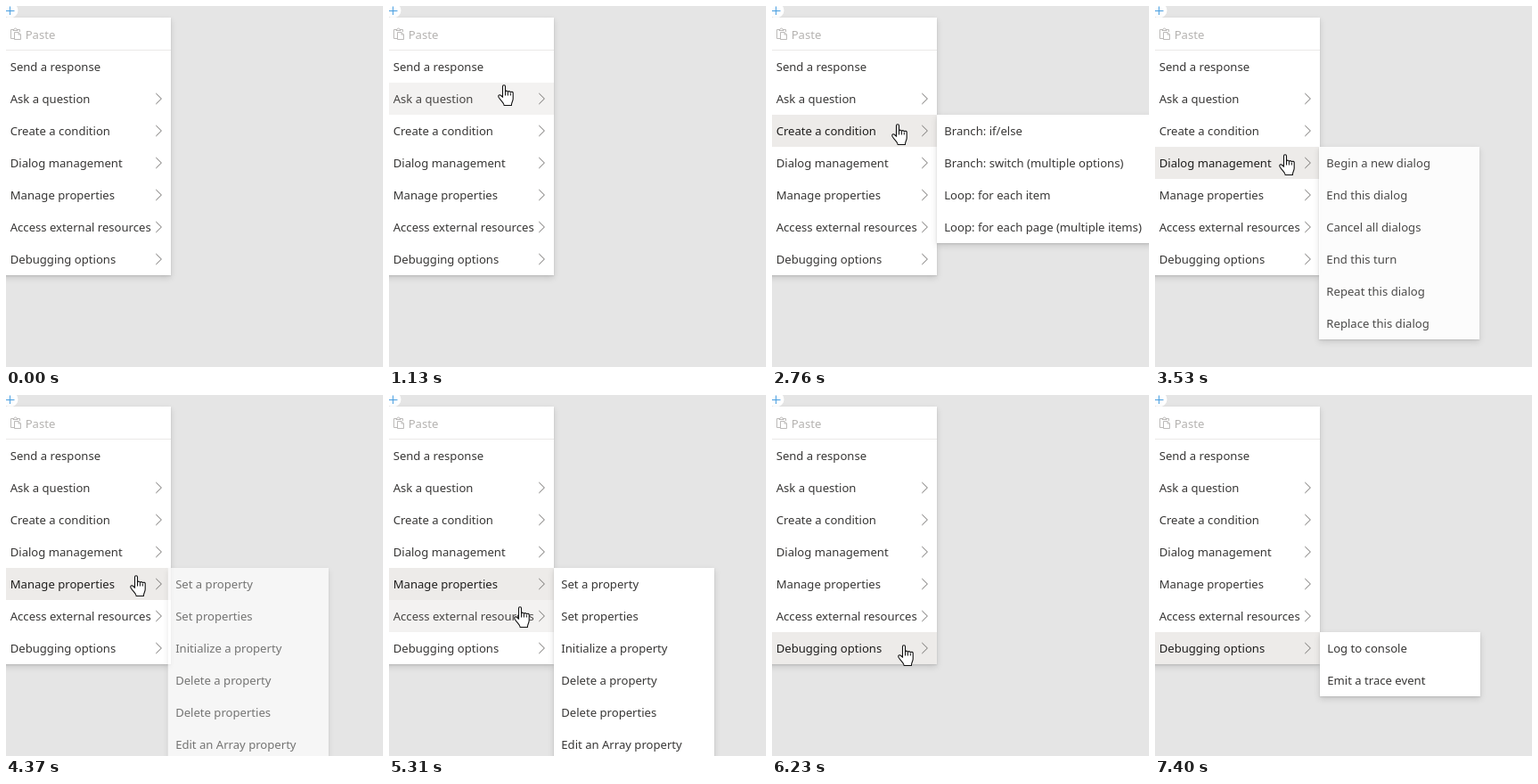
Write an HTML page with a canvas that moves like this. It is 423x405 px and loops after 7930 ms.

```html
<!DOCTYPE html>
<html lang="en">
<head>
<meta charset="utf-8">
<title>Action menu</title>
<style>
html, body { margin: 0; width: 100%; height: 100%; overflow: hidden; background: #e5e5e5; }
canvas { display: block; }
</style>
</head>
<body>
<canvas id="stage" width="423" height="405"></canvas>
<script>
const ctx = document.getElementById('stage').getContext('2d');
const LOOP = 7930, ROW = 36, MENU_RIGHT = 185, MENU_TOP = 50;
const INK = '#383736', INK_HOVER = '#484644', INK_EXPANDED = '#201f1e', INK_DISABLED = '#b5b3b1';
const HOVER = '#f3f2f1', EXPANDED = '#edebe9';

const items = [
  { label: 'Send a response' },
  { label: 'Ask a question', opens: 1330, width: 180, sub: ['Text input', 'Number input', 'Confirmation',
    'Multiple choice', 'File or attachment', 'Date or time', 'OAuth login'] },
  { label: 'Create a condition', opens: 2480, width: 242, sub: ['Branch: if/else',
    'Branch: switch (multiple options)', 'Loop: for each item', 'Loop: for each page (multiple items)'] },
  { label: 'Dialog management', opens: 3400, width: 180, sub: ['Begin a new dialog', 'End this dialog',
    'Cancel all dialogs', 'End this turn', 'Repeat this dialog', 'Replace this dialog'] },
  { label: 'Manage properties', opens: 4320, width: 180, sub: ['Set a property', 'Set properties',
    'Initialize a property', 'Delete a property', 'Delete properties', 'Edit an Array property'] },
  { label: 'Access external resources', opens: 5410, width: 219, sub: ['Connect to a skill',
    'Send an HTTP request', 'Emit a custom event', 'Connect to QnA Knowledgebase'] },
  { label: 'Debugging options', opens: 6230, width: 180, sub: ['Log to console', 'Emit a trace event'] }
];

const bursts = [[70, 510, 7], [660, 660, 1], [830, 830, 1], [1060, 1610, 8], [1760, 1760, 1],
  [1990, 2760, 11], [2990, 3300, 5], [3450, 3680, 4], [3840, 4220, 6], [4370, 4610, 4],
  [4850, 5310, 7], [5460, 5690, 4], [5920, 6550, 9], [6860, 7400, 8]];
const ticks = [0];
for (const [from, to, count] of bursts) {
  for (let i = 0; i < count; i++) {
    const time = from + (count > 1 ? (to - from) * i / (count - 1) : 0);
    ticks.push(Math.floor(time / 10) * 10);
  }
}

// Pointer moves: start, end, x, y of the fingertip.
const moves = [[70, 510, 128, 78], [650, 660, 129, 84], [820, 830, 128, 84], [1000, 1300, 130, 94],
  [1750, 1760, 130, 95], [1910, 2400, 141, 132], [2900, 3300, 146, 166], [3760, 4220, 146, 202],
  [4780, 5310, 147, 237], [5850, 6150, 148, 280], [6790, 7400, 425, 410]];

const clamp = v => Math.min(1, Math.max(0, v));
const smooth = v => v * v * (3 - 2 * v);

function pointerAt(t) {
  let x = 295, y = 297;
  for (const [from, to, nx, ny] of moves) {
    const k = smooth(clamp((t - from) / (to - from)));
    x += (nx - x) * k;
    y += (ny - y) * k;
  }
  return { x, y, visible: t >= 70 && t < 7400 };
}

// cubic-bezier(.1, .9, .2, 1), solved by bisection
function decelerate(x) {
  if (x <= 0) return 0;
  if (x >= 1) return 1;
  const curve = (s, a, b) => 3 * (1 - s) ** 2 * s * a + 3 * (1 - s) * s * s * b + s ** 3;
  let lo = 0, hi = 1;
  for (let i = 0; i < 24; i++) {
    const mid = (lo + hi) / 2;
    if (curve(mid, .1, .2) < x) lo = mid; else hi = mid;
  }
  return curve(lo, .9, 1);
}

function rect(x, y, w, h, color) {
  ctx.fillStyle = color;
  ctx.fillRect(x, y, w, h);
}

function stroke(path, color, width = 1) {
  ctx.strokeStyle = color;
  ctx.lineWidth = width;
  ctx.stroke(new Path2D(path));
}

function text(label, x, y, color) {
  ctx.font = '13.1px "Noto Sans", "Open Sans", sans-serif';
  ctx.fillStyle = color;
  ctx.fillText(label, x, y);
}

// The shadow stays outside the box, so a translucent panel does not show it through.
function panel(x, y, w, h) {
  ctx.save();
  const outside = new Path2D();
  outside.rect(-50, -50, 600, 600);
  outside.rect(x, y, w, h);
  ctx.clip(outside, 'evenodd');
  for (const [dy, blur, alpha] of [[3.2, 7.2, .132], [.6, 1.8, .108]]) {
    ctx.shadowColor = `rgba(0,0,0,${alpha})`;
    ctx.shadowOffsetY = dy;
    ctx.shadowBlur = blur;
    rect(x, y, w, h, '#fff');
  }
  ctx.restore();
  rect(x, y, w, h, '#fff');
}

function addButton() {
  ctx.fillStyle = '#fff';
  ctx.beginPath();
  ctx.arc(5, 5, 8.5, 0, 7);
  ctx.fill();
  stroke('M0 5.5H9.5M4.5 0.5V10', '#4a9fe0');
}

function pasteRow() {
  stroke('M9.5 36.5H5.5V26.5H8M13 26.5H15.5V29M8 27.5V26.5H9A1.5 1.5 0 0 1 12 26.5H13V27.5Z', INK_DISABLED, .9);
  stroke('M9.5 29.5H14L16.5 32V37.5H9.5ZM14 29.5V32H16.5', INK_DISABLED, .9);
  text('Paste', 21.7, 37, INK_DISABLED);
  rect(0, 49, MENU_RIGHT, 1, '#eae9e8');
}

function mainMenu(hovered, expanded) {
  panel(-10, 13, MENU_RIGHT + 10, 289);
  pasteRow();
  items.forEach((item, i) => {
    const y = MENU_TOP + i * ROW;
    let ink = INK;
    if (item === expanded) {
      rect(0, y, MENU_RIGHT, ROW, EXPANDED);
      ink = INK_EXPANDED;
    } else if (i === hovered) {
      rect(0, y, MENU_RIGHT, ROW, HOVER);
      ink = INK_HOVER;
    }
    text(item.label, 4.7, y + 23, ink);
    if (item.sub) stroke(`M168.3 ${y + 12}L174.4 ${y + 18}L168.3 ${y + 24}`, '#72706e');
  });
}

function subMenu(item, t, pointer) {
  const k = decelerate((t - item.opens) / 367);
  if (!k) return;
  const top = MENU_TOP + items.indexOf(item) * ROW;
  const x = MENU_RIGHT - 10 * (1 - k);

  ctx.save();
  ctx.globalAlpha = k;
  panel(x, top, item.width, item.sub.length * ROW);
  item.sub.forEach((label, i) => {
    const y = top + i * ROW;
    const over = pointer.visible && pointer.x >= x && pointer.x < x + item.width &&
      pointer.y >= y && pointer.y < y + ROW;
    if (over) rect(x, y, item.width, ROW, HOVER);
    text(label, x + 8.3, y + 23, over ? INK_HOVER : INK);
  });
  ctx.restore();
}

const hand = 'M5.5 14V2.2a1.5 1.5 0 0 1 3 0V8.4a1.45 1.4 0 0 1 2.9 .4a1.45 1.4 0 0 1 2.9 .6' +
  'a1.45 1.4 0 0 1 2.9 .8V16c0 3-1.8 3.5-1.8 7.5H7.2C7 20.5 3.5 18.5 1 14.2C0 12.2 2.2 11 3.6 12.5Z';
const arrow = 'M.5 .5V16.5L4.2 13L6.6 18.5L9 17.5L6.6 12H11.7Z';

function drawPointer({ x, y }, overMenu) {
  ctx.save();
  ctx.translate(Math.round(x) - (overMenu ? 7 : 0), Math.round(y));
  const shape = overMenu ? hand : arrow;
  ctx.fillStyle = '#fff';
  ctx.fill(new Path2D(shape));
  stroke(shape, '#111', 1.1);
  if (overMenu) stroke('M8.5 8V12.5M11.4 9V12.5M14.3 10V12.5', '#111');
  ctx.restore();
}

function draw(t) {
  const pointer = pointerAt(t);
  const expanded = items.filter(item => item.opens <= t).pop();
  const inMain = pointer.visible && pointer.x < MENU_RIGHT && pointer.y < 302;
  const hovered = inMain ? Math.floor((pointer.y - MENU_TOP) / ROW) : -1;

  rect(0, 0, 423, 405, '#e5e5e5');
  addButton();
  mainMenu(hovered, expanded);
  if (expanded) subMenu(expanded, t, pointer);

  if (!pointer.visible) return;
  const subBottom = expanded ? MENU_TOP + (items.indexOf(expanded) + expanded.sub.length) * ROW : 0;
  const inSub = expanded && pointer.x >= MENU_RIGHT &&
    pointer.x < MENU_RIGHT + expanded.width && pointer.y < subBottom;
  drawPointer(pointer, inMain || inSub);
}

function frame() {
  const now = performance.now() % LOOP;
  draw(ticks.filter(time => time <= now).pop());
  requestAnimationFrame(frame);
}
frame();
</script>
</body>
</html>
```
